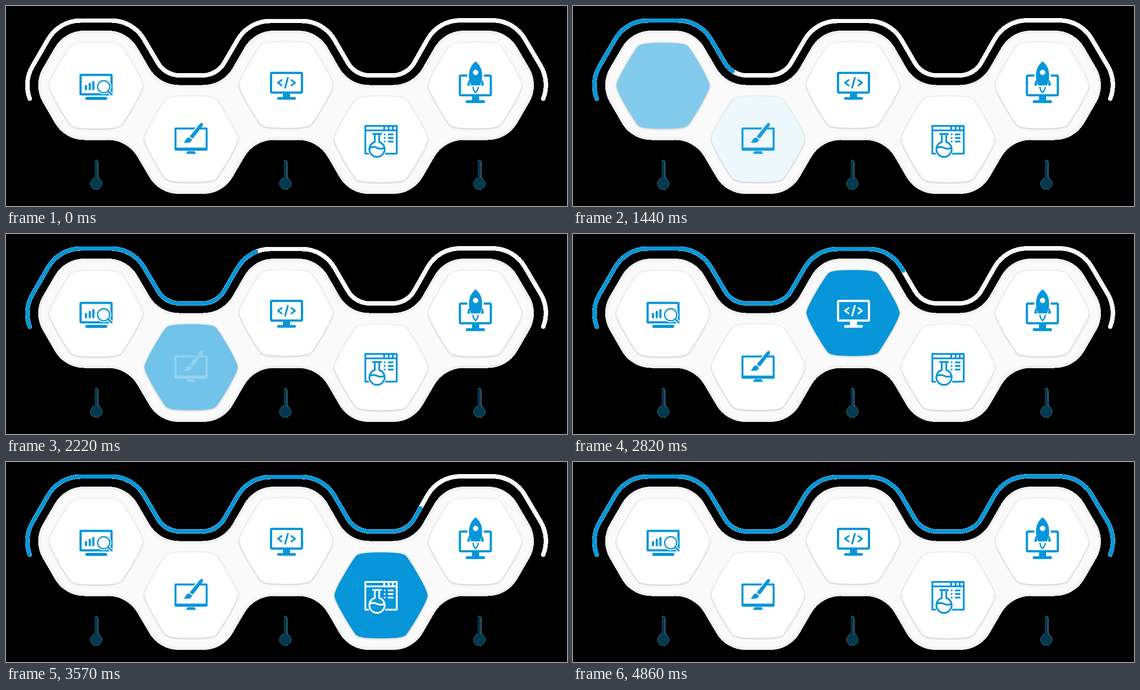
Write an HTML page that moves like this. It is 1252 px wide and 447 px high and loops after 4890 ms.

```html
<!DOCTYPE html>
<html lang="en">
<head>
<meta charset="utf-8">
<title>Five step process</title>
<style>
  html, body { margin: 0; width: 100%; height: 100%; overflow: hidden; background: #000; }
  svg { display: block; width: 100%; height: 100%; }
  .crisp { shape-rendering: crispEdges; }
  .rail { fill: none; stroke-width: 10; stroke-linecap: round; }
  .tile { filter: drop-shadow(0 1px 2px rgba(0, 0, 0, .28)); }
  .step { --tile: #fff; --ink: #0696d9; }
  .step .tile { fill: var(--tile); }
  .step .fill { fill: var(--ink); }
  .step .line { fill: none; stroke: var(--ink); stroke-width: 5; stroke-linejoin: round; }
  .step .thin { stroke-width: 4; }
  .step .round { stroke-linecap: round; }
  .step .gap { fill: var(--tile); stroke: var(--tile); }
</style>
</head>
<body>
<svg viewBox="0 0 1252 447">
  <defs>
    <path id="hex" d="M-104 0C-104-14-64-79-56-88C-50-95-25-96 0-96S50-95 56-88C64-79 104-14 104 0S64 79 56 88C50 95 25 96 0 96S-50 95-56 88C-64 79-104 14-104 0Z"/>
    <g id="pinShape">
      <rect x="-3.5" y="344.500" width="7" height="46" rx="3"/>
      <circle cy="397" r="13"/>
    </g>
    <g id="pin">
      <use href="#pinShape" class="crisp" fill="#fff" stroke="#fff" stroke-width=".6"/>
      <use href="#pinShape" fill="#003a52"/>
    </g>
    <clipPath id="inside"><path class="outline"/></clipPath>
    <filter id="soft"><feGaussianBlur stdDeviation="3"/></filter>
  </defs>

  <path class="outline crisp" fill="#fafafa"/>
  <g clip-path="url(#inside)">
    <path class="outline" fill="none" stroke="#dcdcdc" stroke-width="4" filter="url(#soft)"/>
  </g>
  <path class="rail crisp" stroke="#fafafa"/>
  <path class="rail" id="progress" stroke="#0696d9" pathLength="162" style="stroke-width:9.2"/>

  <use href="#pin" x="201.5"/>
  <use href="#pin" x="623.5"/>
  <use href="#pin" x="1056.5"/>

  <!-- Analysis -->
  <g class="step" transform="translate(201 178)">
    <use href="#hex" class="tile"/>
    <rect class="line" x="-34.5" y="-24" width="69" height="43.500" rx="1.5"/>
    <path class="line round" d="M-22.5 1V8M-14-4V8M-6-8V8"/>
    <rect class="fill" x="-24" y="25" width="49" height="7" rx="3.5"/>
    <circle class="gap" cx="17" cy="2.5" r="16.5"/>
    <path class="gap" d="M27 13L38 23" stroke-width="8"/>
    <circle class="line" cx="17" cy="2.5" r="13.5" style="stroke-width:3"/>
    <path class="line thin round" d="M28 13.5L35 20"/>
  </g>

  <!-- Design -->
  <g class="step" transform="translate(413 297.5)">
    <use href="#hex" class="tile"/>
    <path class="fill" fill-rule="evenodd" d="M-34-26H34Q37-26 37-23V23Q37 26 34 26H-34Q-37 26-37 23V-23Q-37-26-34-26ZM-32.5-21.5V19H32.5V-21.5ZM-8 27H8Q9 31 12 33H-12Q-9 31-8 27Z"/>
    <path class="gap round" d="M22-33L-2-3" stroke-width="10"/>
    <path class="fill" d="M18-32Q22-37 25-36Q28-34 26-30L4-1L-3-6Z"/>
    <path class="fill" d="M-5-4Q0-2 2 2Q0 8-7 8Q-13 9-17 7Q-13 6-12 1Q-9-3-5-4Z"/>
  </g>

  <!-- Development -->
  <g class="step" transform="translate(625 176.5)">
    <use href="#hex" class="tile"/>
    <rect class="line" x="-33.5" y="-27" width="69" height="44" rx="2"/>
    <path class="fill" d="M-7 19H9V28H-7Z"/>
    <rect class="fill" x="-20" y="27" width="42" height="6" rx="3"/>
    <path class="line thin round" d="M-10-11L-18-5L-10 1M12-11L20-5L12 1M4-16L-2 6"/>
  </g>

  <!-- Testing -->
  <g class="step" transform="translate(837 298)">
    <use href="#hex" class="tile"/>
    <path class="line thin" d="M-35-30H35V32H-35ZM-35-20H35"/>
    <path class="line thin" d="M7-30V-20M17-30V-20M26-30V-20"/>
    <path class="line thin round" d="M8-11H8.1M17-11H26M8-3H8.1M17-3H26M8 5H8.1M17 5H26"/>
    <circle class="gap" cx="-9" cy="23" r="20"/>
    <path class="gap" d="M-17-11H-1V12H-17Z" stroke-width="4"/>
    <path class="line thin round" d="M-18-12H0M-14-12V6A17 17 0 1 0-4 6V-12"/>
    <path class="line thin" d="M-25 19Q-17 15-9 19T8 19"/>
  </g>

  <!-- Launch -->
  <g class="step" transform="translate(1047 177.5)">
    <use href="#hex" class="tile"/>
    <rect class="line" x="-34" y="-22" width="69" height="44" rx="2"/>
    <path class="fill" d="M-7 24H9V34H-7Z"/>
    <rect class="fill" x="-21" y="33" width="43" height="6.5" rx="3"/>
    <path class="gap" d="M1-50C-13-38-18-21-12-8L-15 1H17L14-8C20-21 15-38 1-50Z" stroke-width="6"/>
    <path class="fill" d="M1-54C-12-43-19-25-9 0H11C21-25 14-43 1-54ZM-13-13Q-18-7-17 1L-11 0ZM15-13Q20-7 19 1L13 0Z"/>
    <path class="line" d="M-5 3Q-4 12 1 16Q6 12 7 3" style="stroke-width:3"/>
    <circle class="gap" cx="1" cy="-29" r="5.5"/>
  </g>
</svg>

<script>
const FRAME = 30, FRAMES = 163, FADE = 210;
const FIRST_ON = 630, SPACING = 795, ON_TIME = 705;
const BLUE = [6, 150, 217], WHITE = [255, 255, 255];

// Closed polygon with every corner replaced by an arc of the same radius.
function roundedPolygon(points, radius) {
  const count = points.length;
  const toward = ([x, y], [u, v], length) => {
    const scale = length / Math.hypot(u - x, v - y);
    return [x + (u - x) * scale, y + (v - y) * scale];
  };
  return points.map((corner, i) => {
    const before = points[(i + count - 1) % count], after = points[(i + 1) % count];
    const cross = (corner[0] - before[0]) * (after[1] - corner[1])
                - (corner[1] - before[1]) * (after[0] - corner[0]);
    const cut = radius / Math.sqrt(3);
    const start = toward(corner, before, cut), end = toward(corner, after, cut);
    return `${i ? "L" : "M"}${start}A${radius} ${radius} 0 0 ${cross > 0 ? 1 : 0} ${end}`;
  }).join("") + "Z";
}

const body = roundedPolygon([
  [131, 55], [271, 55], [342, 176.5], [484, 176.5], [554, 55], [696, 55],
  [766, 176.5], [908, 176.5], [978, 55], [1119, 55], [1190, 177], [1119, 299.5],
  [978, 299.5], [908, 420], [766, 420], [696, 299.5], [554, 299.5], [484, 420],
  [342, 420], [271, 299.5], [131, 299.5], [60, 177]
], 76);

const crest = (x, y) => `A84 84 0 0 1 ${x} ${y}`;
const dip = (x, y) => `A56 56 0 0 0 ${x} ${y}`;
const rail = "M53 207" + crest(59, 135) +
  "L94 74.5" + crest(166.5, 32.5) + "H235.5" + crest(308, 74.5) +
  "L339 127" + dip(387, 155) + "H439" + dip(487, 127) +
  "L517 75.5" + crest(589.5, 33.5) + "H660.5" + crest(733, 75.5) +
  "L763 127" + dip(811, 155) + "H863" + dip(911, 127) +
  "L941 74" + crest(1013.5, 32) + "H1085.5" + crest(1158, 74) +
  "L1194 135" + crest(1199, 207);

const all = selector => [...document.querySelectorAll(selector)];
all(".outline").forEach(path => path.setAttribute("d", body));
all(".rail").forEach(path => path.setAttribute("d", rail));
const progress = document.getElementById("progress");
const steps = all(".step");

const clamp = value => Math.min(1, Math.max(0, value));
const mix = (from, to, amount) =>
  `rgb(${from.map((channel, i) => Math.round(channel + (to[i] - channel) * amount))})`;

function draw(now) {
  const frame = Math.floor(now / FRAME) % FRAMES;
  const time = frame * FRAME;
  progress.style.visibility = frame ? "visible" : "hidden";
  progress.setAttribute("stroke-dasharray", `${frame} 400`);
  steps.forEach((step, i) => {
    const age = time - FIRST_ON - i * SPACING;
    const lit = clamp(age / FADE) - clamp((age - ON_TIME) / FADE);
    step.style.setProperty("--tile", mix(WHITE, BLUE, lit));
    step.style.setProperty("--ink", mix(BLUE, WHITE, lit));
  });
}

const began = performance.now();
function tick() {
  draw(performance.now() - began);
  requestAnimationFrame(tick);
}
tick();
</script>
</body>
</html>
```
